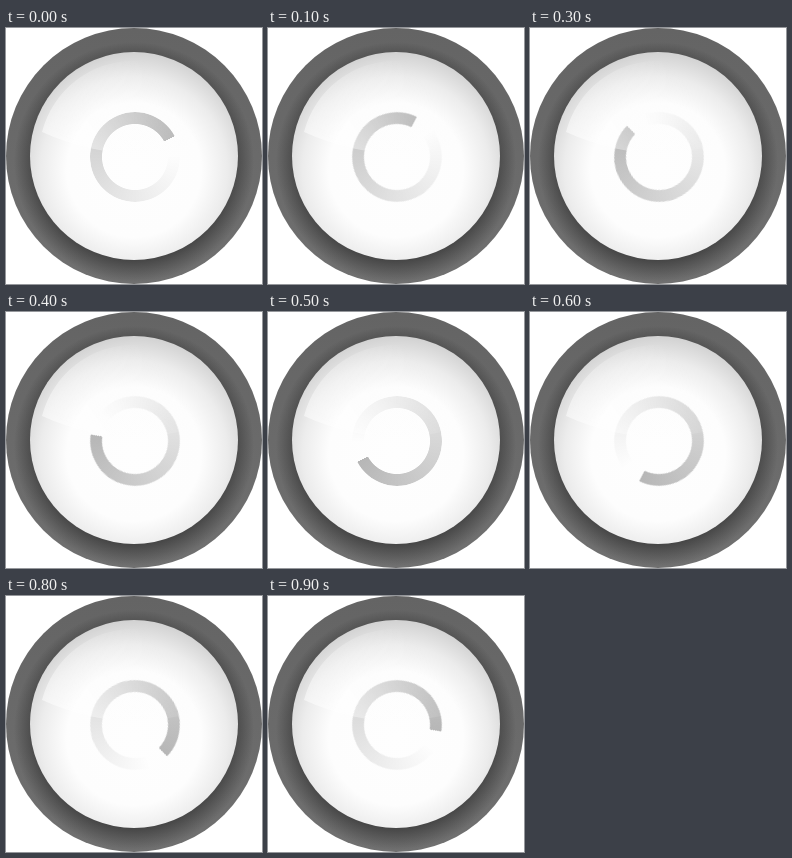
Recreate the animation shown at these times as an HTML page. Size 256 by 256 pixels, loop 1000 ms.

```html
<!DOCTYPE html>
<html lang="en">
<head>
<meta charset="utf-8">
<title>Loading</title>
<style>
html, body { margin: 0; width: 100%; height: 100%; overflow: hidden; background: #fff; }
#stage { position: relative; width: 256px; height: 256px; overflow: hidden; }
svg { position: absolute; left: 0; top: 0; display: block; }
#ring {
  position: absolute; left: 83.5px; top: 83.5px; width: 90px; height: 90px;
  border-radius: 50%;
  background: conic-gradient(from 62deg, rgba(0,0,0,0) 0deg, rgba(0,0,0,0) 25deg, rgba(0,0,0,.28) 360deg);
  -webkit-mask: radial-gradient(circle, transparent 32.6px, #000 33.4px);
  mask: radial-gradient(circle, transparent 32.6px, #000 33.4px);
}
</style>
</head>
<body>
<div id="stage">
  <svg width="256" height="256" viewBox="0 0 256 256">
    <defs>
      <linearGradient id="rim" x1="0" y1="0" x2="0" y2="1">
        <stop offset="0" stop-color="#646464"/>
        <stop offset="1" stop-color="#707070"/>
      </linearGradient>
      <radialGradient id="shade" gradientUnits="userSpaceOnUse" cx="128" cy="134" r="120">
        <stop offset=".8" stop-color="#333" stop-opacity=".75"/>
        <stop offset="1" stop-color="#333" stop-opacity="0"/>
      </radialGradient>
      <radialGradient id="ball" gradientUnits="userSpaceOnUse" cx="128" cy="142" r="120">
        <stop offset="0" stop-color="#fefefe"/>
        <stop offset=".56" stop-color="#fdfdfd"/>
        <stop offset=".78" stop-color="#ececec"/>
        <stop offset="1" stop-color="#cfcfcf"/>
      </radialGradient>
      <clipPath id="disc"><circle cx="128" cy="128" r="128"/></clipPath>
    </defs>
    <circle cx="128" cy="128" r="128" fill="url(#rim)"/>
    <circle cx="128" cy="134" r="120" fill="url(#shade)" clip-path="url(#disc)"/>
    <circle cx="128" cy="128" r="104" fill="url(#ball)"/>
  </svg>
  <div id="ring"></div>
  <svg width="256" height="256" viewBox="0 0 256 256">
    <defs>
      <linearGradient id="gloss" gradientUnits="userSpaceOnUse" x1="50" y1="118" x2="150" y2="48">
        <stop offset="0" stop-color="#fff" stop-opacity=".5"/>
        <stop offset="1" stop-color="#fff" stop-opacity="0"/>
      </linearGradient>
    </defs>
    <path d="M36 104A95 95 0 0 1 220 104Q128 146 36 104Z" fill="url(#gloss)"/>
  </svg>
</div>
<script>
const STEPS = 10, LOOP = 1000;
document.getElementById('ring').animate(
  [{ transform: 'rotate(0deg)' }, { transform: 'rotate(-360deg)' }],
  { duration: LOOP, iterations: Infinity, easing: `steps(${STEPS}, end)` }
);
</script>
</body>
</html>
```
